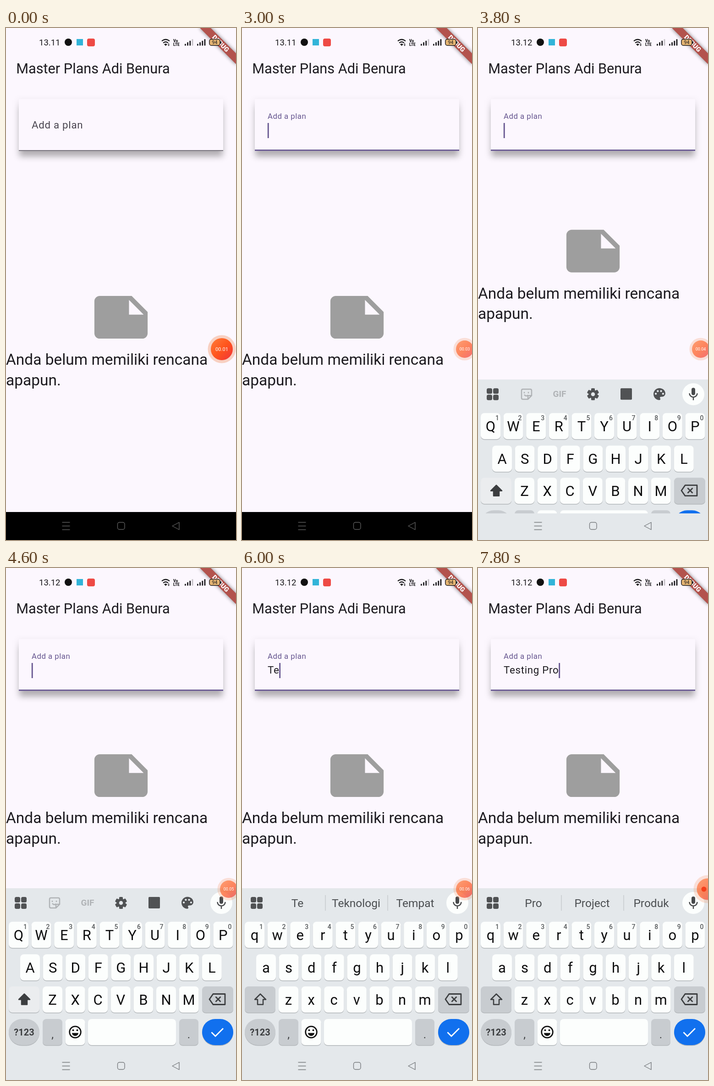
Recreate the animation shown at these times as an HTML page. Size 502 by 1116 pixels, loop 8 s.

```html
<!DOCTYPE html>
<html lang="id">
<head>
<meta charset="utf-8">
<title>Master Plans</title>
<style>
html, body { margin: 0; width: 100%; height: 100%; overflow: hidden; background: #fcf7fe; }
svg { display: block; width: 100vw; height: 100vh; font-family: Roboto, sans-serif; }
text { white-space: pre; }
.mid { text-anchor: middle; }
</style>
</head>
<body>
<svg id="stage" viewBox="0 0 502 1116">
  <defs>
    <filter id="soft" x="-20%" y="-40%" width="140%" height="190%"><feGaussianBlur stdDeviation="7"/></filter>
    <filter id="ribbonBlur" x="-20%" y="-80%" width="140%" height="260%"><feGaussianBlur stdDeviation="4"/></filter>
    <linearGradient id="hot" x1="0" y1="0" x2="1" y2="1">
      <stop offset="0" stop-color="#ff7c3c"/><stop offset=".5" stop-color="#ff551c"/><stop offset="1" stop-color="#f0323c"/>
    </linearGradient>
  </defs>
  <rect width="502" height="1116" fill="#fcf7fe"/>

  <text x="22.3" y="99" font-size="30.67" fill="#1d1b20">Master Plans Adi Benura</text>

  <g filter="url(#soft)">
    <rect x="26" y="157" width="450" height="122" opacity=".07"/>
    <rect x="30" y="172" width="442" height="108" opacity=".25"/>
  </g>
  <rect x="28" y="155" width="446" height="113" fill="#fcf7fe"/>
  <rect id="underline" x="28" width="446"/>
  <text id="label" x="56">Add a plan</text>
  <text id="entry" x="56" y="230" font-size="22.3" letter-spacing=".7" fill="#1d1b20"></text>
  <rect id="caret" y="207" width="2.8" height="33" fill="#65558f"/>

  <g id="empty">
    <path transform="translate(181.3 560.8) scale(5.81)" fill="#9e9e9e" fill-rule="evenodd"
      d="M22 10l-6-6H4c-1.1 0-2 .9-2 2v12c0 1.1.9 2 2 2h16c1.1 0 2-.9 2-2zM15 5.5l5.5 5.5H15z"/>
    <g font-size="33.46" fill="#1d1b20">
      <text x="0" y="734">Anda belum memiliki rencana</text>
      <text x="0" y="778.6">apapun.</text>
    </g>
  </g>

  <g transform="translate(502 0) rotate(45)">
    <rect x="-56" y="39" width="112" height="16.7" fill="#000" opacity=".5" filter="url(#ribbonBlur)"/>
    <rect x="-56" y="39" width="112" height="16.7" fill="#b3534d"/>
    <text class="mid" x="0" y="52.3" font-size="14.2" font-weight="900" fill="#fff">DEBUG</text>
  </g>

  <g id="status">
    <text id="clock" x="72" y="38" font-size="18.5" fill="#18171a"></text>
    <circle cx="136" cy="31" r="8" fill="#111"/>
    <rect x="154" y="24" width="14" height="14" fill="#32b4d8"/>
    <rect x="177" y="23" width="17" height="17" rx="4" fill="#ee4a45"/>
    <path d="M340 28.5q8.5-7 17 0M343 32.5q5.5-4.5 11 0" fill="none" stroke="#1b1a1d" stroke-width="2.2"/>
    <path d="M345 35.5q3.5-3 7 0l-3.5 3.5zM353 36l2-2.5 2 2.5zM353 37l2 2.5 2-2.5z" fill="#1b1a1d"/>
    <g font-size="8.5" font-weight="900" fill="#1b1a1d">
      <text x="365" y="31">Vo</text><text x="365" y="38.5">LTE</text>
    </g>
    <g id="signal"></g>
    <rect x="444" y="24.5" width="23" height="13.5" rx="4" fill="#e5b573" stroke="#1b1a1d" stroke-width="1.5"/>
    <path d="M469 29v5" stroke="#1b1a1d" stroke-width="2"/>
    <text class="mid" x="455.5" y="35" font-size="10.5" fill="#1b1a1d">94</text>
  </g>

  <rect y="1055" width="502" height="61" fill="#000"/>
  <g id="panel">
    <g id="keyboard">
      <rect y="698" width="502" height="418" fill="#e4e8eb"/>
      <g fill="#505254">
        <rect x="19" y="717" width="12" height="12" rx="3.5"/><rect x="33" y="717" width="12" height="12" rx="3.5"/>
        <rect x="19" y="731" width="12" height="12" rx="3.5"/><rect x="33" y="731" width="12" height="12" rx="3.5"/>
      </g>
      <g id="tools">
        <path d="M98 719h16q3 0 3 3v11l-8 8h-11q-3 0-3-3v-16q0-3 3-3zM117 733h-8v8M101 731q4 5 8 1M101 725v3M110 725v3"
          fill="none" stroke="#b0b3b6" stroke-width="2.5"/>
        <text class="mid" x="178" y="736" font-size="19" font-weight="700" fill="#b0b3b6">GIF</text>
        <g id="gear" fill="#505254"></g>
        <rect x="311" y="717" width="25" height="25" rx="2" fill="#505254"/>
        <g transform="translate(378.7 712.5) scale(1.44)">
          <path fill="#505254" d="M12 3c-4.97 0-9 4.03-9 9s4.03 9 9 9c.83 0 1.5-.67 1.5-1.5 0-.39-.15-.74-.39-1.01-.23-.26-.38-.61-.38-.99 0-.83.67-1.5 1.5-1.5H16c2.76 0 5-2.24 5-5 0-4.42-4.03-8-9-8z"/>
          <g fill="#e4e8eb"><circle cx="6.5" cy="11.5" r="1.5"/><circle cx="9.5" cy="7.5" r="1.5"/><circle cx="14.5" cy="7.5" r="1.5"/><circle cx="17.5" cy="11.5" r="1.5"/></g>
        </g>
      </g>
      <g id="hints">
        <path d="M182 713v34M318 713v34" stroke="#c3c7ca" stroke-width="1.3"/>
        <g class="mid" font-size="24.5" fill="#4b4e51">
          <text x="121" y="739"></text><text x="249" y="739"></text><text x="378" y="739"></text>
        </g>
      </g>
      <circle cx="470" cy="730" r="24" fill="#fcfefd"/>
      <rect x="466" y="716" width="8" height="16" rx="4" fill="#47494b"/>
      <path d="M461.5 728a8.5 8.5 0 0 0 17 0M470 737v6" fill="none" stroke="#47494b" stroke-width="2.5"/>
      <g id="keys"></g>
      <path id="shift" d="M40 928.5L52 940.5H46V951.5H34V940.5H28Z" stroke="#3c3e40" stroke-width="2.5" stroke-linejoin="round"/>
      <path d="M452 928.5H478V951.5H452L444 940ZM457.5 934.5l11 11m0-11l-11 11" fill="none" stroke="#3c3e40" stroke-width="2.8" stroke-linejoin="round"/>
      <circle cx="151" cy="1011.5" r="12.3" fill="none" stroke="#111" stroke-width="2.8"/>
      <path d="M144 1013.5h14a7 6.5 0 0 1-14 0z" fill="#111"/>
      <circle cx="146.5" cy="1007.5" r="2" fill="#111"/><circle cx="155.5" cy="1007.5" r="2" fill="#111"/>
      <path d="M448.5 1012l8.5 8.5 17-17" fill="none" stroke="#fff" stroke-width="2.8"/>
    </g>
    <rect y="1058" width="502" height="58" fill="#e4e8eb"/>
  </g>

  <g id="nav" fill="none" stroke-width="1.4">
    <path d="M122.5 1077.5h17M122.5 1085.5h17M122.5 1093.5h17"/>
    <rect x="243.5" y="1077.5" width="15.5" height="15.5" rx="4"/>
    <path d="M363 1085.5L378 1077.5V1093.5Z" stroke-linejoin="round"/>
  </g>

  <g id="bubble">
    <circle id="ring" cy="700" fill="#f09060"/>
    <circle id="core" cy="700" fill="url(#hot)"/>
    <circle id="dot" cx="493" cy="700" r="5.5" fill="#f5401c"/>
    <text id="counter" class="mid" fill="#fff"></text>
  </g>
</svg>
<script>
const LOOP = 8000, STEP = 200, KEYBOARD_DROP = 360;
const $ = id => document.getElementById(id);
const set = (el, attrs) => { for (const k in attrs) el.setAttribute(k, attrs[k]); };
const show = (el, on) => set(el, { visibility: on ? 'visible' : 'hidden' });
// Latest entry of a [time, ...values] schedule.
const at = (plan, t) => plan.filter(p => p[0] <= t).pop();

const key = (x, y, w, fill = '#fcfefd', r = 8, id = '') =>
  `<rect x="${x}" y="${y + 1.5}" width="${w}" height="57" rx="${r}" fill="#b3b7ba"/>
   <rect ${id} x="${x}" y="${y}" width="${w}" height="57" rx="${r}" fill="${fill}"/>`;
const caption = (x, y, size, text, extra = '') =>
  `<text class="mid" x="${x}" y="${y}" font-size="${size}" ${extra}>${text}</text>`;

function buildKeys() {
  const pitch = 49.6, grey = '#c8ccd0';
  let out = '';
  [['QWERTYUIOP', 6, 771], ['ASDFGHJKL', 31, 842], ['ZXCVBNM', 80, 912]].forEach(([row, left, y], r) => {
    [...row].forEach((ch, i) => {
      const x = left + i * pitch;
      out += key(x, y, 43) + caption(x + 21.5, y + 40, 31, ch, 'data-letter fill="#0d0d0e"');
      if (!r) out += caption(x + 36, y + 16, 14, (i + 1) % 10, 'font-weight="500" fill="#55585a"');
    });
  });
  out += key(6, 912, 67, grey, 8, 'id="shiftKey"') + key(428, 912, 68, grey);
  out += key(6, 983, 67, grey, 28.5) + caption(39.5, 1019, 20, '?123', 'font-weight="700" fill="#3c3e40"');
  out += key(80, 983, 43, grey) + caption(101.5, 1025, 24, ',', 'fill="#3c3e40"');
  out += key(129.5, 983, 43) + key(179, 983, 192);
  out += key(378, 983, 42, grey) + caption(399, 1025, 24, '.', 'fill="#3c3e40"');
  out += key(428, 983, 68, '#1170ee', 28.5);
  $('keys').innerHTML = out;
}

function buildIcons() {
  let bars = '', teeth = '';
  [390, 417].forEach((x, s) => {
    for (let i = 0; i < 4; i++) {
      const h = 4 + i * 3.4;
      bars += `<rect x="${x + i * 5.2}" y="${38.5 - h}" width="2.8" height="${h}" rx="1" fill="${!s && i === 3 ? '#c4c0c6' : '#1b1a1d'}"/>`;
    }
  });
  for (let a = 0; a < 360; a += 60)
    teeth += `<rect x="247" y="717" width="8" height="7" rx="1.5" transform="rotate(${a} 251 730)"/>`;
  $('signal').innerHTML = bars;
  $('gear').innerHTML = teeth + '<circle cx="251" cy="730" r="7" fill="none" stroke="#505254" stroke-width="5.5"/>';
}

const typing = [
  [0, ''],
  [5000, 'T', 'T Tidak Tapi'],
  [5800, 'Te', 'Te Teknologi Tempat'],
  [6200, 'Tes', 'Tes Test Testing'],
  [6400, 'Test', 'Test Testing Tester'],
  [6600, 'Testi', 'Testi Testing Testimoni'],
  [6800, 'Testing', 'the and of'],
  [7200, 'Testing ', 'the and of'],
  [7400, 'Testing P', 'P Pada Pagi'],
  [7600, 'Testing Pr', 'Pr Pro Project'],
  [7800, 'Testing Pro', 'Pro Project Produk']
];
// time, centre x, ring radius, core radius, text size, opacity
const bubblePlan = [
  [0, 471, 30.5, 24, 11.1, 1],
  [1200, 479, 27, 21.5, 10, .8],
  [1400, 486, 24.5, 19, 9, .65],
  [6400, 501, 30.5, 23.5, 0, .65]
];
const secondsPlan = [[0, 1], [1000, 2], [2200, 3], [3200, 4], [4200, 5], [5200, 6], [6200, 7]];

function drawField(t, entry) {
  const focused = t >= 3000;
  const accent = focused ? '#65558f' : '#49454f';
  set($('label'), focused
    ? { y: 198, 'font-size': 16.73, 'letter-spacing': .52, fill: accent }
    : { y: 219, 'font-size': 22.3, 'letter-spacing': .7, fill: accent });
  set($('underline'), { y: focused ? 265 : 266.4, height: focused ? 2.8 : 1.4, fill: accent });
  $('entry').textContent = entry;
  show($('caret'), focused);
  set($('caret'), { x: 55.8 + (entry ? $('entry').getComputedTextLength() : 0) });
}

function drawKeyboard(t, words) {
  const rise = Math.min(1, Math.max(0, (t - 3600) / 400));
  const drop = KEYBOARD_DROP * (1 - rise) ** 2.4;
  const upper = t < 5000 || (t >= 7200 && t < 7400);
  show($('panel'), t >= 3600);
  set($('keyboard'), { transform: `translate(0 ${drop})` });
  set($('empty'), { transform: `translate(0 ${-178 * (1 - drop / KEYBOARD_DROP)})` });
  document.querySelectorAll('[data-letter]').forEach(el => {
    el.textContent = upper ? el.textContent.toUpperCase() : el.textContent.toLowerCase();
  });
  set($('shift'), { fill: upper ? '#3c3e40' : 'none' });
  set($('shiftKey'), { fill: upper ? '#ebedef' : '#c8ccd0' });
  $('tools').style.display = words ? 'none' : '';
  $('hints').style.display = words ? '' : 'none';
  const list = (words || '').split(' ');
  $('hints').querySelectorAll('text').forEach((el, i) => { el.textContent = list[i] || ''; });
  set($('nav'), { stroke: t < 3600 ? '#5c5c5c' : t < 3800 ? '#c5c9cc' : '#777b7e' });
}

function drawBubble(t) {
  const [, cx, outer, inner, size, alpha] = at(bubblePlan, t);
  set($('ring'), { cx, r: outer, opacity: .38 * alpha });
  set($('core'), { cx, r: inner, opacity: alpha });
  show($('dot'), !size);
  show($('counter'), size > 0);
  set($('counter'), { x: cx, y: 700 + size * .36, 'font-size': size });
  $('counter').textContent = '00.0' + at(secondsPlan, t)[1];
}

function draw(time) {
  const t = Math.floor(time % LOOP / STEP) * STEP;
  const [, entry, words] = at(typing, t);
  $('clock').textContent = t < 3200 ? '13.11' : '13.12';
  drawField(t, entry);
  drawKeyboard(t, words);
  drawBubble(t);
}

buildKeys();
buildIcons();
const start = performance.now();
function tick() {
  draw(performance.now() - start);
  requestAnimationFrame(tick);
}
tick();
</script>
</body>
</html>
```
